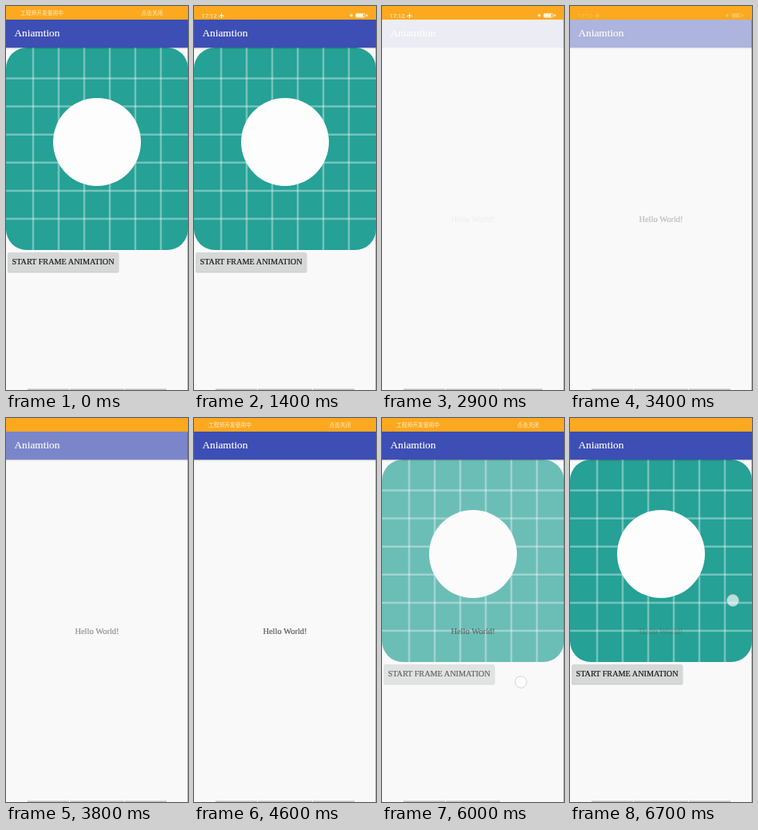
An HTML page that plays this animation: 228 px wide and 480 px high, repeating every 6800 ms.

```html
<!DOCTYPE html>
<html lang="en">
<head>
<meta charset="utf-8">
<title>Fade between two screens</title>
<style>
  html, body { margin: 0; width: 100%; height: 100%; overflow: hidden; background: #f9f9f9; }
  svg { display: block; width: 228px; height: 480px; }
  .serif { font-family: "Liberation Serif", "Times New Roman", serif; stroke-width: .15; }
  .cjk { font: 6.75px "Noto Sans CJK SC", "Noto Sans CJK", sans-serif; }
  .clock { font: 7.6px Roboto, sans-serif; }
</style>
</head>
<body>
<svg viewBox="0 0 228 480">
  <defs>
    <linearGradient id="shade" x2="0" y2="1">
      <stop stop-opacity=".25"/>
      <stop offset="1" stop-opacity="0"/>
    </linearGradient>
  </defs>
  <rect width="228" height="480" fill="#f9f9f9"/>
  <path d="M227.5 16V480" stroke="#aaa" stroke-opacity=".8"/>

  <g id="main">
    <rect y="52" width="228" height="253" rx="26" fill="#25a196"/>
    <g id="grid" stroke="#fff" stroke-opacity=".36" stroke-width="2.5"></g>
    <circle cx="114" cy="170" r="55" fill="#fdfdfd"/>
    <rect x="2" y="309" width="139.5" height="24.5" rx="2" fill="#000" opacity=".17"/>
    <rect x="2.5" y="308" width="138.5" height="24" rx="1.5" fill="#d6d7d7"/>
    <text class="serif" x="7.5" y="323" font-size="10.2" fill="#111" stroke="#111">START FRAME ANIMATION</text>
  </g>

  <text id="hello" class="serif" x="114" y="269.5" font-size="10.5" text-anchor="middle" fill="#555" stroke="#555">Hello World!</text>

  <g id="bar">
    <rect y="52" width="228" height="2" fill="url(#shade)"/>
    <rect y="16" width="228" height="36" fill="#3d4eb4"/>
  </g>
  <text class="serif" x="10.5" y="38" font-size="13.3" fill="#fff" stroke="#fff">Aniamtion</text>

  <rect width="228" height="17" fill="#fda91f"/>
  <g id="notice" class="cjk" fill="#fff0d2">
    <text x="18" y="11.3">工程师开发使用中</text>
    <text x="169.5" y="11.3">点击关闭</text>
  </g>
  <g id="status" fill="#fff4dc">
    <text class="clock" x="9.5" y="14.5">17:12</text>
    <path d="M34 8.5h1v2.3l3 1.9v.8l-3-.9v1.4l1 .6v.5h-3v-.5l1-.6v-1.4l-3 .9v-.8l3-1.9z"/>
    <circle cx="197" cy="11.8" r="1.8"/>
    <rect x="202.8" y="9.4" width="11.4" height="4.8" rx="1.2" fill="none" stroke="#fff4dc" stroke-width=".8"/>
    <rect x="203" y="9.8" width="9" height="4"/>
    <path d="M215 11.8h3M216.5 10.2v3.2" stroke="#fff4dc" stroke-width=".8"/>
  </g>

  <g stroke="#c0c0c0" stroke-width="1.6">
    <path d="M27 479.2H79M80 479.2H148"/>
    <path id="navEnd" d="M149 479.2H201"/>
  </g>
  <circle id="touch" r="7.3" fill="#fff" fill-opacity=".68" stroke="#c4cccb" stroke-width=".8"/>
</svg>
<script>
const LOOP = 6800, STEP = 100;
const el = id => document.getElementById(id);
const fade = (id, alpha) => el(id).style.opacity = alpha;

// Crossing translucent lines, brighter where they meet.
for (let i = 0; i < 6; i++) {
  el("grid").innerHTML +=
    `<path d="M${34 + 32 * i} 52V305"/><path d="M0 ${90.5 + 35.1 * i}H228"/>`;
}

function draw(now) {
  const t = Math.floor(now % LOOP / STEP) * STEP;
  const ramp = (from, to) => Math.min(1, Math.max(0, (t - from) / (to - from)));

  const main = 1 - ramp(2300, 2900) ** 3.4 + ramp(5600, 6200);
  const second = ramp(2800, 4300);
  fade("main", main);
  fade("hello", second - .62 * ramp(5800, 6700));
  fade("bar", Math.max(main, second));
  fade("notice", 1 - ramp(0, 500) + ramp(3800, 4600) - ramp(6200, 6700));
  fade("status", ramp(900, 1400) - ramp(2900, 3600));
  fade("navEnd", t >= 5600 && t < 6200 ? 0 : 1);

  // The finger swipes up and slows down.
  const swipe = 1 - (1 - ramp(5600, 6700)) ** 2;
  fade("touch", t >= 5600 ? 1 : 0);
  el("touch").setAttribute("cx", 130 + 74 * swipe);
  el("touch").setAttribute("cy", 480 - 252 * swipe);
}

const start = performance.now();
function tick() {
  draw(performance.now() - start);
  requestAnimationFrame(tick);
}
tick();
</script>
</body>
</html>
```
